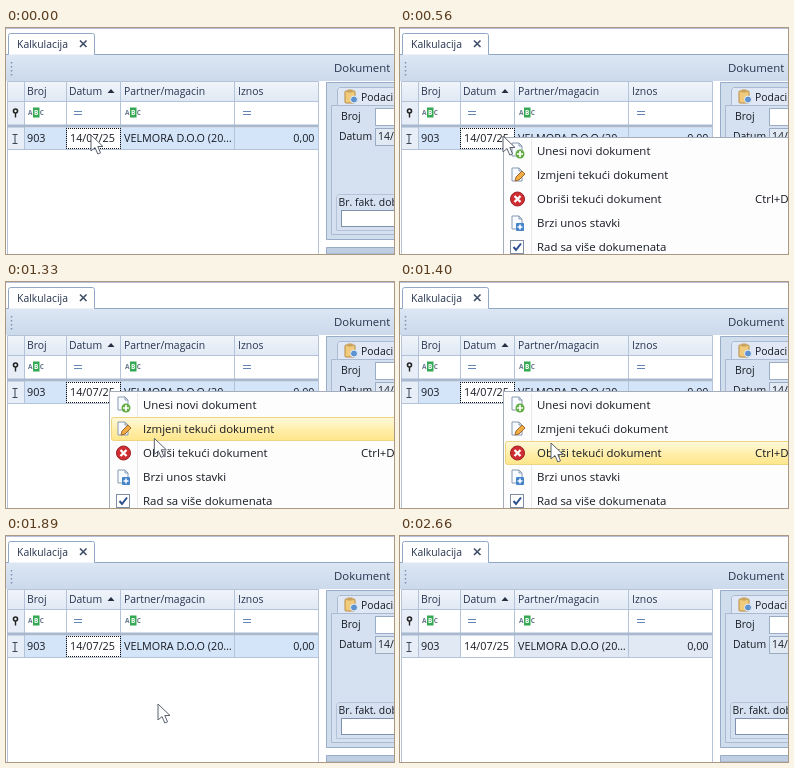
Recreate the animation shown at these times as an HTML page. Size 388 by 226 pixels, loop 3.5 s.

```html
<!DOCTYPE html>
<html lang="sr">
<head>
<meta charset="utf-8">
<title>Kalkulacija</title>
<style>
  html, body { margin: 0; width: 100%; height: 100%; overflow: hidden; }
  svg { display: block; width: 388px; height: 226px; font: 10.4px "Open Sans", sans-serif; }
  text { fill: #161a22; white-space: pre; }
  .cells text { font-size: 10.8px; }
  .menu text { font-size: 11.45px; }
  .head text, .tab { fill: #26344f; }
  .line { fill: none; stroke: #b4c3d8; }
</style>
</head>
<body>
<svg viewBox="0 0 388 226">
  <defs>
    <linearGradient id="bar" x2="0" y2="1">
      <stop stop-color="#dde7f4"/><stop offset="1" stop-color="#cbd9eb"/>
    </linearGradient>
    <linearGradient id="header" x2="0" y2="1">
      <stop stop-color="#f1f5fb"/><stop offset="1" stop-color="#dfe8f4"/>
    </linearGradient>
    <linearGradient id="hover" x2="0" y2="1">
      <stop stop-color="#fff9dc"/><stop offset=".5" stop-color="#ffefad"/><stop offset="1" stop-color="#ffe68a"/>
    </linearGradient>
    <g id="abc" font-size="6.5" font-weight="700">
      <rect x="4.5" y="-5" width="6.5" height="10" fill="#35a853"/>
      <text x="-.5" y="2.5" style="fill:#66758a">A</text>
      <text x="5.6" y="2.5" style="fill:#fff">B</text>
      <text x="11.3" y="2.5" style="fill:#66758a">C</text>
    </g>
    <path id="equals" d="M0-1.5h8M0 1.5h8" stroke="#6487b8"/>
    <path id="page" d="M-5-7H2L5-4V6H-5ZM2-7V-4H5" fill="#f8fbff" stroke="#8798b0"/>
  </defs>

  <!-- Tab strip and toolbar -->
  <rect width="388" height="226" fill="#fff"/>
  <path d="M0 .5H388" stroke="#b9bfd8"/>
  <rect y="26" width="388" height="27" fill="url(#bar)"/>
  <path d="M0 26.5H2.5V7.5Q2.5 5.5 4.5 5.5H86.5Q88.5 5.5 88.5 7.5V26.5H388" fill="#fff" stroke="#91a7c6"/>
  <text class="tab" x="11" y="20">Kalkulacija</text>
  <path d="M74 12.5L80.5 19M80.5 12.5L74 19" stroke="#3d4c66" stroke-width="1.6"/>
  <path d="M5.5 34V48" stroke="#7d92b2" stroke-width="1.5" stroke-dasharray="1.5 2.5"/>
  <text class="tab" x="328" y="44" font-size="11.4">Dokument</text>

  <!-- Grid -->
  <rect x="1" y="53" width="312" height="21" fill="url(#header)"/>
  <rect x="1" y="74" width="17" height="48" fill="#e7eef7"/>
  <rect id="row" x="18" y="100" width="294" height="21"/>
  <rect x="60" y="100" width="54" height="21" fill="#fff"/>
  <path class="line" d="M1.5 226V53.5H312.5V226M1 73.5H312M1 121.5H312M18.5 54V121M60.5 54V121M114.5 54V121M228.5 54V121"/>
  <path d="M1 98H312" stroke="#a8b8ce" stroke-width="3"/>
  <g class="head">
    <text x="21" y="67">Broj</text>
    <text x="63" y="67">Datum</text>
    <text x="118" y="67">Partner/magacin</text>
    <text x="232" y="67">Iznos</text>
  </g>
  <path d="M101.5 65H108.5L105 61Z" fill="#252f40"/>
  <circle cx="9.5" cy="83" r="2" fill="none" stroke="#222" stroke-width="1.6"/>
  <path d="M9.5 85V89.5" stroke="#222" stroke-width="1.4"/>
  <use href="#abc" x="22.5" y="84.5"/><use href="#abc" x="119.5" y="84.5"/>
  <use href="#equals" x="68" y="85"/><use href="#equals" x="237" y="85"/>
  <path d="M6.5 106.5H11.5M9 106.5V115.5M6.5 115.5H11.5" stroke="#3b4658" fill="none"/>
  <g class="cells">
    <text x="21" y="114.3">903</text>
    <text x="64" y="114.3">14/07/25</text>
    <text x="118" y="114.3">VELMORA D.O.O (20…</text>
    <text x="308.5" y="114.3" text-anchor="end">0,00</text>
  </g>
  <path id="focus" d="M60 100.5H115M60 120.5H115M60.5 100V121M114.5 100V121" stroke="#111" stroke-dasharray="1 1"/>

  <!-- Document panel -->
  <path d="M388 54.5H320.5V211.5H388" fill="#d0dded" stroke="#98abc7"/>
  <path d="M388 77.5H325.5V206.5H388" fill="#d5e1f0" stroke="#a9bad2"/>
  <path d="M388 59.5H333.5L331.5 61.5V77.5H388" fill="#dfe8f4" stroke="#a9bad2"/>
  <rect x="339" y="63" width="10" height="12" rx="1" fill="#f0cb7c" stroke="#b98b45"/>
  <rect x="341.5" y="61.5" width="5" height="3" fill="#c9a25c"/>
  <circle cx="348" cy="71.5" r="3.5" fill="#5f93cf" stroke="#e6eef8"/>
  <text x="355" y="73">Podaci</text>
  <text x="335" y="92">Broj</text>
  <text x="333" y="112">Datum</text>
  <rect x="369.5" y="80.5" width="30" height="17" fill="#fff" stroke="#9bacc5"/>
  <rect x="369.5" y="100.5" width="30" height="17" fill="#e1e9f3" stroke="#9bacc5"/>
  <text x="372" y="112">14/07/25</text>
  <path class="line" d="M388 166.5H332.5L330.5 168.5V202.5H388"/>
  <text x="332.5" y="178">Br. fakt. dobavljača</text>
  <rect x="335.5" y="182.5" width="60" height="16" fill="#fff" stroke="#7f91ac"/>
  <path d="M388 219.5H320.5V226H388" fill="#bfcee3" stroke="#98abc7"/>

  <!-- Context menu -->
  <g id="menu" class="menu">
    <rect x="103.5" y="109.5" width="300" height="130" fill="#fdfdfe" stroke="#a5adba"/>
    <path d="M131.5 111V226" stroke="#e6e9ee"/>
    <rect id="hot" x="105.5" width="300" height="23" rx="2" fill="url(#hover)" stroke="#ecd57c"/>
    <g id="items"></g>
    <text x="355" y="175">Ctrl+Del</text>
    <g transform="translate(117 122)">
      <use href="#page"/><circle cx="3" cy="4" r="4.5" fill="#63ad42"/>
      <path d="M0 4H6M3 1V7" stroke="#fff" stroke-width="1.7"/>
    </g>
    <g transform="translate(117 147)">
      <use href="#page"/><path d="M-2 6L-1 2L5-4L8-1L2 5Z" fill="#f1ad45" stroke="#a3672c"/>
    </g>
    <g transform="translate(117.5 171)">
      <circle r="7" fill="#cf2d32" stroke="#9c2025"/>
      <path d="M-3-3L3 3M3-3L-3 3" stroke="#fff" stroke-width="2.3"/>
    </g>
    <g transform="translate(117 195)">
      <use href="#page"/><rect x="-1" y="0" width="8" height="8" rx="1" fill="#4583cb"/>
      <path d="M.5 4H5.5M3 1.5V6.5" stroke="#fff" stroke-width="1.5"/>
    </g>
    <g transform="translate(117 219)" fill="none">
      <rect x="-6.5" y="-6.5" width="13" height="13" fill="#fff" stroke="#7e8da3"/>
      <path d="M-3.5 0L-1 3L4-3.5" stroke="#2d508f" stroke-width="2"/>
    </g>
  </g>

  <path id="cursor" d="M0 0V16L4 12.5L6.8 19L9.5 17.8L6.8 11.5H12Z" fill="#fff" stroke="#59606c" stroke-linejoin="round"/>
</svg>
<script>
const LOOP = 3500, STEP = 70;
const $ = id => document.getElementById(id);

const labels = ["Unesi novi dokument", "Izmjeni tekući dokument", "Obriši tekući dokument",
  "Brzi unos stavki", "Rad sa više dokumenata"];
$("items").innerHTML = labels.map((label, i) =>
  `<text x="137" y="${126.5 + i * 24.1}">${label}</text>`).join("");

// Keys are [time, ...values]
const pointer = [[0, 85, 107], [70, 108, 107], [140, 132, 108], [210, 103, 108], [840, 103, 108],
  [910, 108, 113], [980, 122, 128], [1050, 134, 139], [1190, 143, 147], [1400, 151, 161],
  [1540, 152, 168], [2380, 152, 168], [2450, 158, 169], [2590, 197, 174]];
const fade = [[350, 0], [560, 1], [1610, 1], [1890, 0]];

function sample(keys, t) {
  const next = keys.findIndex(key => key[0] > t);
  if (next < 0) return keys.at(-1).slice(1);
  if (next === 0) return keys[0].slice(1);
  const a = keys[next - 1], b = keys[next];
  const k = (t - a[0]) / (b[0] - a[0]);
  return a.slice(1).map((value, i) => value + (b[i + 1] - value) * k);
}

const show = (id, on) => $(id).setAttribute("visibility", on ? "inherit" : "hidden");

function draw(now) {
  const t = Math.floor(now % LOOP / STEP) * STEP;
  const [x, y] = sample(pointer, t);
  const hot = Math.floor((y - 111) / 24);
  const focused = t < 1960;

  $("cursor").setAttribute("transform", `translate(${x} ${y})`);
  show("cursor", t < 2660);
  $("menu").setAttribute("opacity", sample(fade, t)[0]);
  $("hot").setAttribute("y", 111.5 + hot * 24);
  show("hot", hot >= 0);
  show("focus", focused);
  $("row").setAttribute("fill", focused ? "#d5e5f9" : "#e1e9f4");
}

function frame() {
  draw(performance.now());
  requestAnimationFrame(frame);
}
frame();
</script>
</body>
</html>
```
